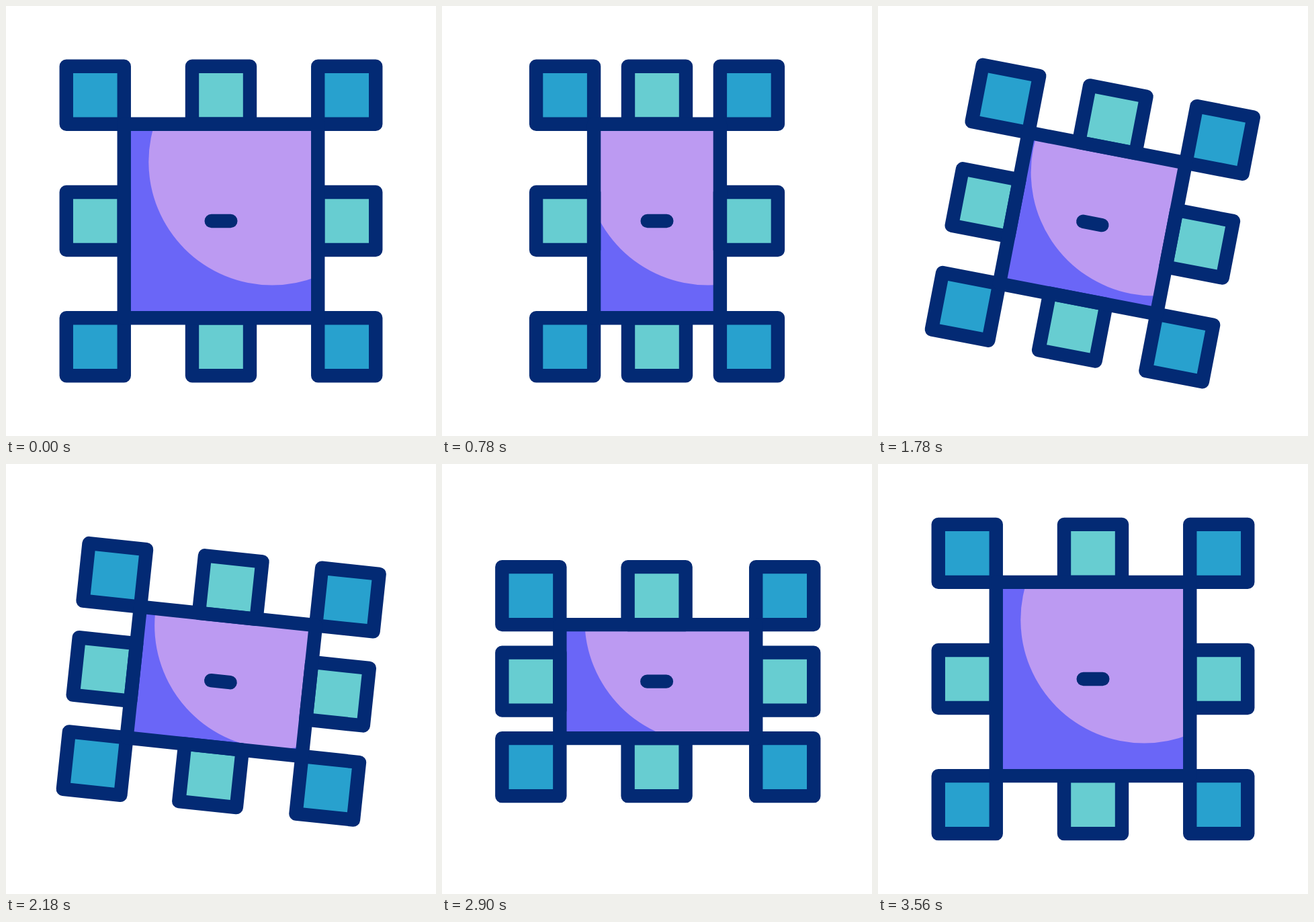
An HTML page for the animation above (3600 ms loop, 640x640 px).

```html
<!DOCTYPE html>
<html lang="en">
<head>
<meta charset="utf-8">
<title>Transform box</title>
<style>
  html, body { margin: 0; width: 100%; height: 100%; overflow: hidden; background: #fff; }
  svg { display: block; width: 100vw; height: 100vh; }
  .line { stroke: #032a74; stroke-width: 20.4; stroke-linejoin: round; stroke-linecap: round; }
</style>
</head>
<body>
<svg viewBox="0 0 640 640">
  <defs><clipPath id="inside"><rect id="clip"/></clipPath></defs>
  <g id="art">
    <rect id="fill" fill="#6a66f7"/>
    <g clip-path="url(#inside)"><circle cx="76" cy="-88.2" r="183.7" fill="#bc9af2"/></g>
    <g id="handles"></g>
    <rect id="frame" class="line" fill="none"/>
    <path id="dash" class="line" d="M-14.3 0H14.3"/>
  </g>
</svg>
<script>
const LOOP = 3600, SPAN = 187.25, HALF = 43;
// time, inset of left, right, top and bottom side, angle, sideways drift
const poses = [
  [0, 0, 0, 0, 0, 0, 0],
  [880, 51.3, 51.3, 0, 0, 0, 0],
  [1740, 25.1, 25.1, 33.1, 26.1, 10.95, 0],
  [2670, 0, -3.8, 71, 62.8, 0, -0.45],
  [3590, 0, 0, 0, 0, 0, 0]
];
const $ = id => document.getElementById(id);

function set(el, attrs) {
  for (const k in attrs) el.setAttribute(k, attrs[k]);
}

// Closed form of cubic-bezier(.5, 0, .5, 1)
function ease(u) {
  const s = 0.5 + Math.sinh(Math.asinh(4 * (u - 0.5)) / 3);
  return s * s * (3 - 2 * s);
}

function poseAt(t) {
  const i = poses.findIndex(p => p[0] > t);
  if (i < 0) return poses[0];
  const a = poses[i - 1], b = poses[i];
  const k = ease((t - a[0]) / (b[0] - a[0]));
  return a.map((v, n) => v + (b[n] - v) * k);
}

const handles = [];
for (let row = 0; row < 3; row++) {
  for (let col = 0; col < 3; col++) {
    if (row === 1 && col === 1) continue;
    const el = document.createElementNS('http://www.w3.org/2000/svg', 'rect');
    set(el, {
      class: 'line', width: 2 * HALF, height: 2 * HALF,
      fill: row === 1 || col === 1 ? '#67cdd1' : '#28a1ce'
    });
    $('handles').append(el);
    handles.push({ el, row, col });
  }
}

function draw(t) {
  const [, l, r, top, bottom, angle, dx] = poseAt(t);
  const xs = [dx - SPAN + l, dx, dx + SPAN - r];
  const ys = [-SPAN + top, (top - bottom) / 2, SPAN - bottom];
  set($('art'), { transform: `translate(320 320) rotate(${angle})` });
  for (const h of handles) set(h.el, { x: xs[h.col] - HALF, y: ys[h.row] - HALF });
  const box = {
    x: xs[0] + HALF, y: ys[0] + HALF,
    width: xs[2] - xs[0] - 2 * HALF, height: ys[2] - ys[0] - 2 * HALF
  };
  for (const id of ['clip', 'fill', 'frame']) set($(id), box);
  set($('dash'), { transform: `translate(${dx} ${ys[1]})` });
}

const start = performance.now();
function tick() {
  draw((performance.now() - start) % LOOP);
  requestAnimationFrame(tick);
}
tick();
</script>
</body>
</html>
```
